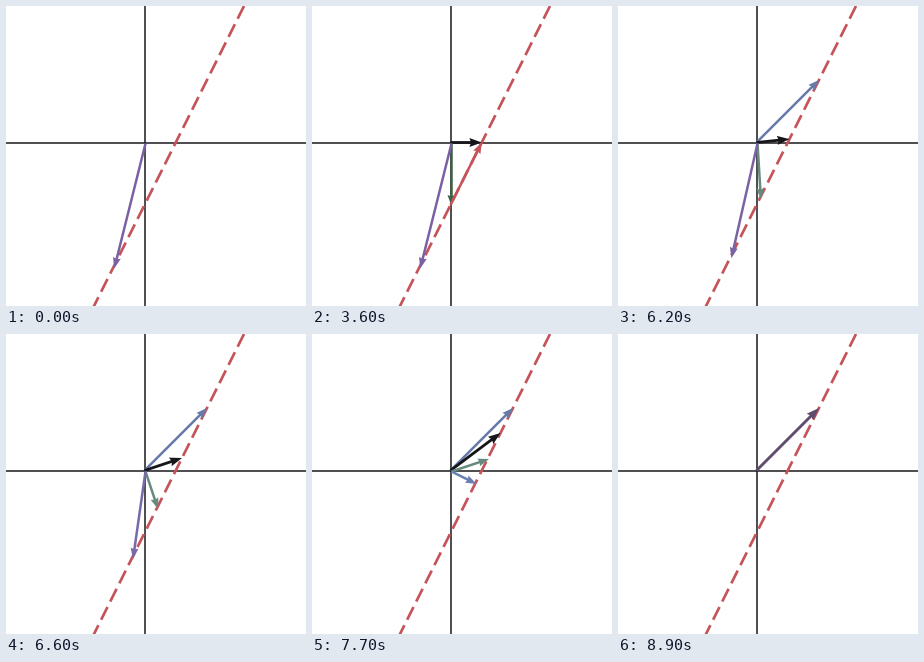
Write a matplotlib script that moves like this. It is 300x300 px and loops after 9.5 s.

```python
import numpy as np
import matplotlib.pyplot as plt
from matplotlib.animation import FuncAnimation
from matplotlib.colors import to_rgb

SIZE, DPI = 300, 100
ORIGIN = 138.5, 136.5      # pixels from the top left
UNIT = 31.25               # pixels per unit
PX = 72 / DPI              # points per pixel
STEP, FRAMES = 100, 95     # ms per frame, frames per loop

INK, RED, BLUE = "#16161a", "#c4545a", "#6679a8"
GREEN, PALE_GREEN = "#3f6045", "#668a7e"
PURPLE, PERIWINKLE, MERGED = "#7c60a4", "#6a7fb2", "#5f4d6c"

# Points on y = 2x - 2, one direction step apart
LOW, MID, NEAR, GOAL = [np.array([x, 2.0 * x - 2]) for x in (-1, 0, 1, 2)]
DIRECTION = np.array([1.0, 2.0])

fig = plt.figure(figsize=(SIZE / DPI, SIZE / DPI), dpi=DPI, facecolor="white")
ax = fig.add_axes([0, 0, 1, 1])
ax.axis("off")
ax.set_xlim(-ORIGIN[0] / UNIT, (SIZE - ORIGIN[0]) / UNIT)
ax.set_ylim((ORIGIN[1] - SIZE) / UNIT, ORIGIN[1] / UNIT)

ax.axhline(0, color=INK, lw=1.5 * PX, zorder=1)
ax.axvline(0, color=INK, lw=1.5 * PX, zorder=1)

# Dashes run from the top edge downwards
line_y = np.array([ORIGIN[1] / UNIT, -6])
dash_width = 2.7
ax.plot(line_y / 2 + 1, line_y, color=RED, lw=dash_width * PX, zorder=2,
        dashes=(14.2 / dash_width, 6.15 / dash_width), dash_capstyle="butt")


def arrow(start, vec, color, zorder, width=2.5):
    return ax.quiver(*start, *vec, color=color, zorder=zorder, width=width,
                     units="dots", angles="xy", scale_units="xy", scale=1,
                     headwidth=3.2, headlength=4.4, headaxislength=4)


def mix(a, b, t):
    return tuple(np.array(to_rgb(a)) * (1 - t) + np.array(to_rgb(b)) * t)


zero = (0, 0)
blue = arrow(zero, GOAL, BLUE, 3)
black = arrow(zero, NEAR, INK, 4, 2.8)
green = arrow(zero, MID, GREEN, 5)
purple = arrow(zero, LOW, PURPLE, 6)
merged = arrow(zero, GOAL, MERGED, 7, 2.9)
steps = [arrow(p, DIRECTION, RED, 8) for p in (LOW, MID, NEAR)]


def slide(ms):
    """Share of the way to the goal that the vectors have covered."""
    if ms < 6200:
        return 0.0
    k = (ms - 6100) / STEP
    return min(1.0, (k + 0.5) / 27.5)


def update(i):
    ms = i * STEP
    t = slide(ms)
    done = ms >= 8900

    for vec, start, since in ((purple, LOW, 0), (green, MID, 1700),
                              (black, NEAR, 3600), (blue, GOAL, 5000)):
        tip = start + (GOAL - start) * t
        vec.set_UVC([tip[0]], [tip[1]])
        vec.set_visible(since <= ms and not done)
    merged.set_visible(done)

    for step, begin, end in zip(steps, (900, 2500, 4400), (2500, 4400, 5700)):
        step.set_visible(begin <= ms < end)

    purple.set_color(mix(PURPLE, PERIWINKLE, min(1, t / 0.6)))
    green.set_color(PALE_GREEN if t > 0 else GREEN)
    return [blue, black, green, purple, merged, *steps]


anim = FuncAnimation(fig, update, frames=FRAMES, interval=STEP,
                     repeat=True, repeat_delay=0, blit=False)
plt.show()
```
